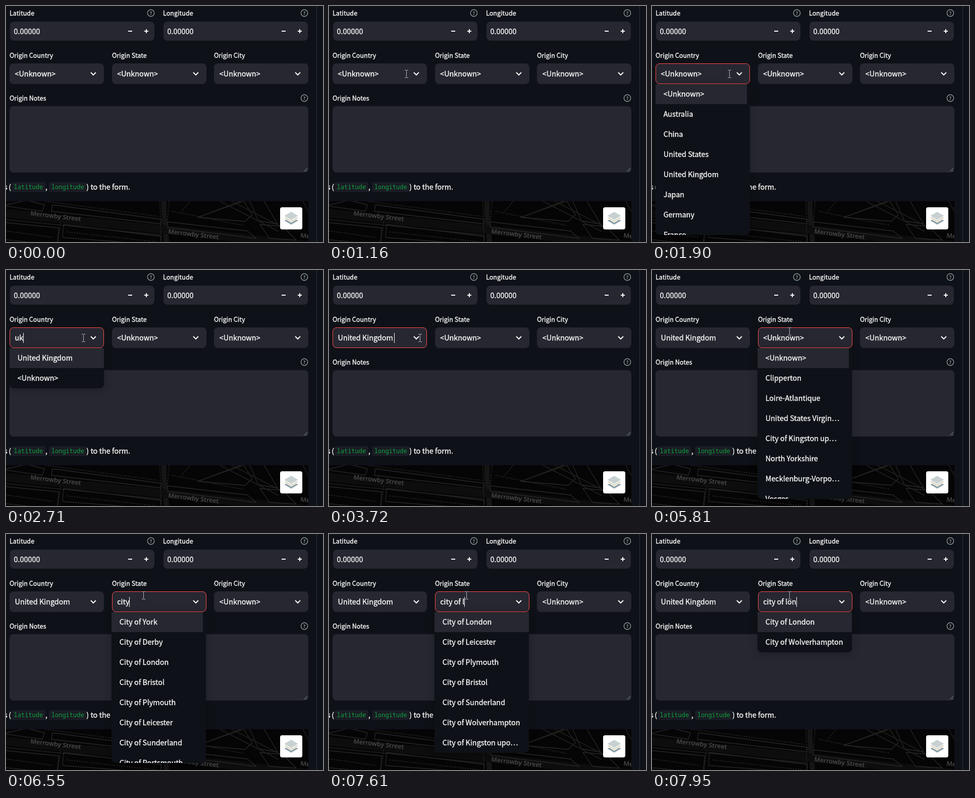
These frames come from a looping animation (628x469 px, 8000 ms). An HTML page with a canvas:

```html
<!DOCTYPE html>
<html lang="en">
<head>
<meta charset="utf-8">
<style>
  html, body { margin: 0; width: 100%; height: 100%; overflow: hidden; background: #0e1117; }
  canvas { display: block; }
</style>
</head>
<body>
<canvas id="stage" width="628" height="469"></canvas>
<script>
const LOOP = 8000;
const ctx = document.getElementById('stage').getContext('2d');
const SANS = '"Noto Sans CJK SC", "Noto Sans CJK JP", "Noto Sans CJK", "Open Sans", sans-serif';
const BODY = `14.4px ${SANS}`, LABEL = `12.6px ${SANS}`, CODE = '12px "Noto Sans Mono", monospace';
const BG = '#0e1117', FIELD = '#262730', INK = '#fafafa', NONE = '<Unknown>';

const countries = [NONE, 'Australia', 'China', 'United States', 'United Kingdom', 'Japan', 'Germany', 'France'];
const states = [NONE, 'Clipperton', 'Loire-Atlantique', 'United States Virgin…', 'City of Kingston up…',
  'North Yorkshire', 'Mecklenburg-Vorpo…', 'Vosges'];
const cityOf = names => names.split(',').map(name => 'City of ' + name);

// Timelines: [start in ms, value]
const countryText = [[0, NONE], [2500, 'u'], [2640, 'uk'], [2980, 'United Kingdom']];
const stateText = [[0, NONE], [6150, 'c'], [6220, 'ci'], [6420, 'cit'], [6550, 'city'], [6950, 'city '],
  [7060, 'city o'], [7170, 'city of'], [7280, 'city of '], [7610, 'city of l'], [7820, 'city of lo'], [7950, 'city of lon']];
const menus = [
  [0, null],
  [1220, countries],
  [2500, ['United States', 'United Kingdom', NONE, 'Australia']],
  [2640, ['United Kingdom', NONE]],
  [2980, null],
  [4140, states],
  [6150, cityOf('York,Derby,London,Bristol,Plymouth,Leicester,Sunderland,Portsmouth')],
  [7610, cityOf('London,Leicester,Plymouth,Bristol,Sunderland,Wolverhampton,Kingston upo…')],
  [7820, cityOf('London,Plymouth,Wolverhampton')],
  [7950, cityOf('London,Wolverhampton')]];
const focus = [[0, ''], [1220, 'country'], [4140, 'state']];
const caret = [[0, false], [1220, true], [1900, false], [2430, true], [3190, false], [3720, true],
  [4820, false], [5280, true], [5810, false], [6150, true]];

const at = (timeline, t) => timeline.findLast(([start]) => start <= t)[1];
const clamp = v => Math.min(1, Math.max(0, v));
const easeOut = (t, start, length) => 1 - (1 - clamp((t - start) / length)) ** 3;

// A thin outline of the given weight makes the glyphs slightly heavier.
function text(str, x, y, font = BODY, color = INK, weight = 0.35) {
  ctx.font = font;
  ctx.fillStyle = ctx.strokeStyle = color;
  ctx.fillText(str, x, y);
  if (weight) {
    ctx.lineWidth = weight;
    ctx.strokeText(str, x, y);
  }
}

function box(x, y, w, h, color, radius = 8) {
  ctx.fillStyle = color;
  ctx.beginPath();
  ctx.roundRect(x, y, w, h, radius);
  ctx.fill();
}

function line(points, color, width = 1, closed = false) {
  ctx.strokeStyle = color;
  ctx.lineWidth = width;
  ctx.beginPath();
  for (let i = 0; i < points.length; i += 2) ctx.lineTo(points[i], points[i + 1]);
  if (closed) ctx.closePath();
  ctx.stroke();
}

function label(str, x, y) { text(str, x, y, LABEL); }

function help(x, y) {
  ctx.strokeStyle = '#87969a';
  ctx.lineWidth = 1.4;
  ctx.beginPath();
  ctx.arc(x, y, 6.7, 0, 7);
  ctx.stroke();
  ctx.textAlign = 'center';
  text('?', x, y + 3.8, `bold 9.5px ${SANS}`, '#87969a', 0);
  ctx.textAlign = 'left';
}

function numberInput(name, x) {
  label(name, x, 19);
  help(x + 280, 14);
  box(x + 1, 31, 286, 38, FIELD);
  text('0.00000', x + 8.5, 56);
  for (const cx of [x + 239, x + 271]) line([cx - 4, 50, cx + 4, 50], INK, 2);
  line([x + 271, 46, x + 271, 54], INK, 2);
}

function select(name, x, value, focusAlpha, showCaret) {
  const left = Math.round(x);
  label(name, left, 103);
  box(left, 114, 187, 41, FIELD);
  if (focusAlpha) {
    ctx.globalAlpha = focusAlpha;
    ctx.strokeStyle = '#ff4b4b';
    ctx.lineWidth = 1;
    ctx.beginPath();
    ctx.roundRect(left + 0.5, 114.5, 186, 40, 7.5);
    ctx.stroke();
    ctx.globalAlpha = 1;
  }
  text(value, x + 10.5, 140);
  if (showCaret) {
    const typed = /^[a-z]/.test(value);
    const end = Math.floor(x + 10.5 + ctx.measureText(value).width + (typed ? 0.6 : 2.6));
    ctx.fillStyle = INK;
    ctx.fillRect(end, 125, 1, 20);
  }
  line([left + 161, 132, left + 166, 137, left + 171, 132], INK, 2);
}

function menu(x, items, alpha) {
  const height = Math.min(300, items.length * 40);
  const scrolls = items.length * 40 > height;
  ctx.save();
  ctx.globalAlpha = alpha;
  ctx.shadowColor = 'rgba(0,0,0,.25)';
  ctx.shadowBlur = 16;
  ctx.shadowOffsetY = 4;
  box(x, 155, 187, height, BG, [0, 0, 8, 8]);
  ctx.shadowColor = 'transparent';
  ctx.clip();
  ctx.fillStyle = FIELD;
  ctx.fillRect(x, 155, scrolls ? 181 : 187, 40);
  items.forEach((item, i) => text(item, x + 15.7, 180 + i * 40));
  ctx.restore();
}

function streetName(x, y) {
  ctx.save();
  ctx.translate(x, y);
  ctx.rotate(0.115);
  text('Merrowby Street', 0, 0, '600 12.5px "Open Sans", sans-serif', '#4c4c4c', 0);
  ctx.restore();
}

function map() {
  ctx.save();
  ctx.beginPath();
  ctx.rect(0, 388, 599, 81);
  ctx.clip();
  ctx.fillStyle = '#050505';
  ctx.fillRect(0, 388, 599, 81);
  ctx.lineJoin = 'round';
  line([313, 388, 313, 412, 318, 469], '#151515', 10);
  line([0, 412, 310, 444, 599, 476], '#0d0d0d', 17);
  const blocks = [
    [-5, 397, 72, 408, 76, 395, 40, 386],
    [92, 395, 308, 424, 307, 433, 90, 408],
    [-5, 430, 105, 441, 101, 475, -5, 464],
    [114, 434, 308, 458, 306, 475, 112, 460],
    [320, 429, 478, 447, 496, 462, 320, 440],
    [380, 420, 474, 428, 488, 415, 470, 386],
    [482, 386, 500, 427, 538, 433, 510, 386],
    [503, 434, 548, 438, 575, 465, 522, 462]
  ];
  for (const points of blocks) line(points, '#272727', 1.3, true);
  for (const points of [[-5, 424, 306, 455], [420, 386, 540, 448], [443, 386, 560, 446], [380, 420, 470, 388], [588, 388, 599, 408]])
    line(points, '#202020', 1.5);
  ctx.setLineDash([2, 3]);
  for (const points of [[78, 388, 302, 418], [0, 447, 94, 460], [108, 430, 103, 469], [305, 388, 307, 469],
    [323, 388, 320, 425], [330, 408, 470, 436], [120, 449, 300, 469], [365, 388, 345, 412]])
    line(points, '#2c2c2c', 1.8);
  ctx.setLineDash([]);
  streetName(48, 416);
  streetName(321, 452);
  streetName(583, 460);
  ctx.restore();

  box(543, 400, 44, 44, '#fff', 4);
  const layers = [[426.5, '#8fa1a8'], [422.5, '#fff'], [421, '#d9d4b9'], [418.5, '#fff'], [417, '#c8d1d2']];
  for (const [y, color] of layers) {
    ctx.fillStyle = color;
    ctx.beginPath();
    ctx.moveTo(565, y - 8);
    ctx.lineTo(578.5, y);
    ctx.lineTo(565, y + 8);
    ctx.lineTo(551.5, y);
    ctx.fill();
  }
}

function instructions() {
  text('s', -4, 365);
  text('(', 5.3, 365);
  box(11, 350, 67, 20, '#1a1c24', 4);
  text('latitude', 15.6, 364, CODE, '#0f9f3d', 0);
  text(',', 78, 365);
  box(85, 350, 74, 20, '#1a1c24', 4);
  text('longitude', 89.8, 364, CODE, '#0f9f3d', 0);
  text(') to the form.', 159.3, 365);
}

function pointer(t) {
  if (t < 600) return;
  let x, y;
  if (t < 3720) {
    const p = easeOut(t, 600, 600);
    x = 472 - 319 * p;
    y = 304 - 169 * p;
  } else {
    const p = easeOut(t, 3720, 380);
    x = 179 + 93 * p;
    y = 135 - 13 * p - 11 * Math.sin(Math.PI * p);
  }
  x = Math.round(x) + 0.5;
  y = Math.round(y);
  line([x, y - 7, x, y + 7], '#b8b8b8');
  for (const edge of [y - 7.5, y + 7.5]) {
    line([x - 3.5, edge, x - 0.5, edge], '#b8b8b8');
    line([x + 0.5, edge, x + 3.5, edge], '#b8b8b8');
  }
}

function draw(t) {
  ctx.fillStyle = BG;
  ctx.fillRect(0, 0, 628, 469);
  ctx.fillStyle = '#30323a';
  ctx.fillRect(615, 0, 1, 469);

  const focused = at(focus, t), caretOn = at(caret, t);
  const opening = easeOut(t, focused === 'state' ? 4140 : 1220, 280);
  const active = name => focused === name ? opening : 0;

  numberInput('Latitude', 7);
  numberInput('Longitude', 311);
  select('Origin Country', 7, at(countryText, t), active('country'), caretOn && focused === 'country');
  select('Origin State', 209.67, at(stateText, t), active('state'), caretOn && focused === 'state');
  select('Origin City', 412.3, NONE, 0, false);

  label('Origin Notes', 7, 188);
  help(591, 183);
  box(7, 199, 592, 132, FIELD);
  line([590, 329, 597, 322], '#8a9094');
  line([594, 329, 597, 326], '#8a9094');

  instructions();
  map();
  const items = at(menus, t);
  if (items) menu(focused === 'state' ? 209 : 7, items, opening);
  pointer(t);
}

function tick() {
  draw(performance.now() % LOOP);
  requestAnimationFrame(tick);
}
tick();
</script>
</body>
</html>
```
